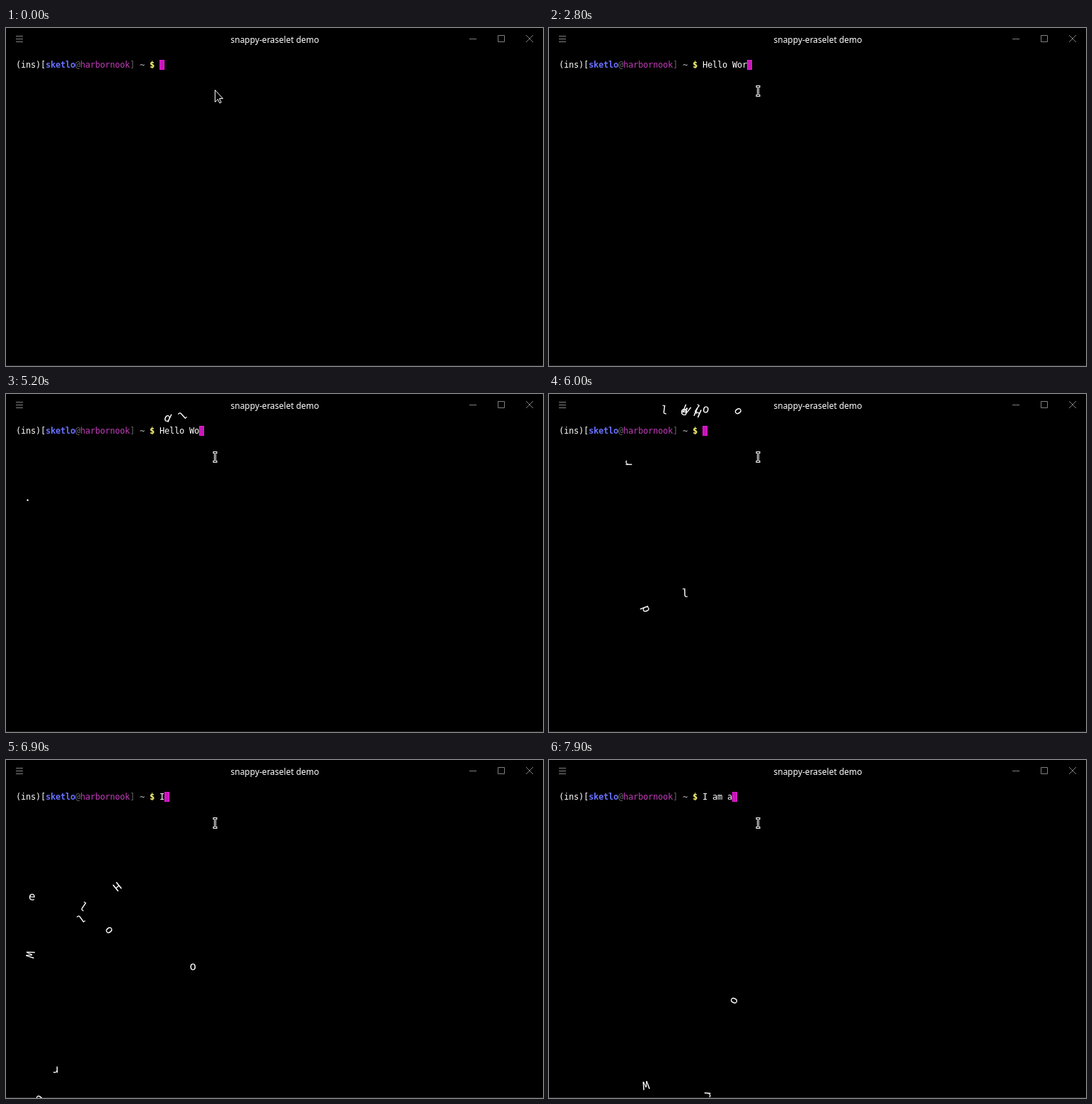
Animation, 759 px wide and 477 px high, one loop 8 s. Source, as an HTML page with a canvas:

```html
<!DOCTYPE html>
<html>
<head>
<meta charset="utf-8">
<style>
html, body { margin: 0; width: 100%; height: 100%; overflow: hidden; background: #000; }
canvas { display: block; }
</style>
</head>
<body>
<canvas id="stage" width="759" height="477"></canvas>
<script>
const ctx = document.getElementById('stage').getContext('2d');
const LOOP = 8000, STEP = 100, CELL = 7, LEFT = 14, INPUT = 217;
const MONO = '"DejaVu Sans Mono", monospace';

// Falling letters, in pixels and seconds
const GRAVITY = 550, LAUNCH = -180, START_Y = 51, FLOOR = 477, WALL = 8;
const FRICTION = 0.8, HIDDEN = 0.06;
const FALL = (Math.sqrt(LAUNCH ** 2 + 2 * GRAVITY * (FLOOR - START_Y)) - LAUNCH) / GRAVITY;
const IMPACT = LAUNCH + GRAVITY * FALL;

const prompt = [
  ['(ins)[', '#fff'], ['sketlo', '#6871ff', 'bold'], ['@', '#686868'],
  ['harbornook', '#c03cb8'], [']', '#686868'], [' ~ ', '#c7c7c7'], ['$', '#fffa72', 'bold'],
];

const GREETING = 'Hello World.', REPLY = 'I am a';
const typed = [1100, 1500, 1900, 2000, 2200, 2300, 2600, 2700, 2800, 3000, 3300, 3300];
const replied = [...REPLY].map((_, i) => 6800 + 200 * i);

// Four single key presses, then the held key repeats
const erased = [...GREETING].map((_, i) => [4200, 4660, 4700, 5145][i] ?? 5580 + 34 * (i - 4));

// Horizontal speed, degrees per second and floor bounce, last letter first
const throws = [
  [-267, 0], [-115, -620, 0.24], [-70, 276], [-192, -105, 0.45], [-4, 136, 0.55],
  [-178, 78, 0.3], [0, 0], [-84, 41], [-115, 122], [-285, 30], [-171, 5], [-59, 130],
];

const letters = throws.map(([speed, spin, bounce = 0], i) => {
  const index = GREETING.length - 1 - i;
  return { char: GREETING[index], x: INPUT + (index + 0.5) * CELL, born: erased[i], speed, spin, bounce };
});

const passed = (times, t) => times.filter(time => time <= t).length;

function inputAt(t) {
  const greeting = GREETING.slice(0, passed(typed, t) - passed(erased, t));
  return greeting + REPLY.slice(0, passed(replied, t));
}

function drawCells(text, x, color, weight = 'normal') {
  ctx.font = `${weight} 12px ${MONO}`;
  ctx.fillStyle = color;
  [...text].forEach((char, i) => ctx.fillText(char, x + i * CELL, 56));
  return x + text.length * CELL;
}

function strokePath(d, color, width = 1) {
  ctx.strokeStyle = color;
  ctx.lineWidth = width;
  ctx.stroke(new Path2D(d));
}

function drawWindow() {
  ctx.fillStyle = '#000';
  ctx.fillRect(0, 0, 759, 477);
  ctx.fillStyle = '#222';
  ctx.fillRect(0, 476, 759, 1);
  ctx.fillStyle = '#fff';
  ctx.font = '12px "Noto Sans", "Open Sans", sans-serif';
  ctx.textAlign = 'center';
  ctx.fillText('snappy-eraselet demo', 380, 20.5);
  ctx.textAlign = 'left';
  strokePath('M14 11.5h10M14 15.5h10M14 19.5h10', '#808080');
  strokePath('M655 15.5h10M695.5 10.5h9v9h-9zM735 10l10 10M745 10l-10 10', '#808080');
}

function drawCursor(x) {
  ctx.fillStyle = '#c616b7';
  ctx.fillRect(x, 45, CELL, 14);
  ctx.strokeStyle = 'rgba(248, 28, 229, 0.8)';
  ctx.lineWidth = 1;
  ctx.strokeRect(x + 0.5, 45.5, CELL - 1, 13);
}

function drawPointer(t) {
  if (t < 100) {
    const arrow = 'M295.5 87.5v17l4-4 2.5 5.5 2.2-1-2.5-5.5h4.8z';
    ctx.fillStyle = '#000';
    ctx.fill(new Path2D(arrow));
    strokePath(arrow, '#fff');
  } else {
    const beam = 'M294 82.5h3M295.5 82.5v13M294 95.5h3';
    ctx.lineCap = 'square';
    strokePath(beam, '#fff', 3);
    strokePath(beam, '#000');
    ctx.lineCap = 'butt';
  }
}

function drawLetter({ char, x, born, speed, spin, bounce }, t) {
  const age = (t - born) / 1000;
  if (age < HIDDEN) return;
  const after = Math.max(0, age - FALL);
  const travel = age - after * (1 - FRICTION);
  const arc = (y, v, s) => y + v * s + GRAVITY / 2 * s * s;
  const y = after && bounce ? arc(FLOOR, -IMPACT * bounce, after) : arc(START_Y, LAUNCH, age);
  ctx.save();
  ctx.translate(WALL + Math.abs(x + speed * travel - WALL), y);
  ctx.rotate(spin * travel * Math.PI / 180);
  ctx.font = `16px ${MONO}`;
  ctx.fillStyle = '#fff';
  ctx.textAlign = 'center';
  ctx.fillText(char, 0, 5);
  ctx.restore();
}

function render(elapsed) {
  const t = Math.floor(elapsed % LOOP / STEP) * STEP;
  drawWindow();
  let x = LEFT;
  for (const [text, color, weight] of prompt) x = drawCells(text, x, color, weight);
  drawCursor(drawCells(inputAt(t), INPUT, '#fff'));
  letters.forEach(letter => drawLetter(letter, t));
  drawPointer(t);
}

const began = performance.now();
function frame() {
  render(performance.now() - began);
  requestAnimationFrame(frame);
}
frame();
</script>
</body>
</html>
```
